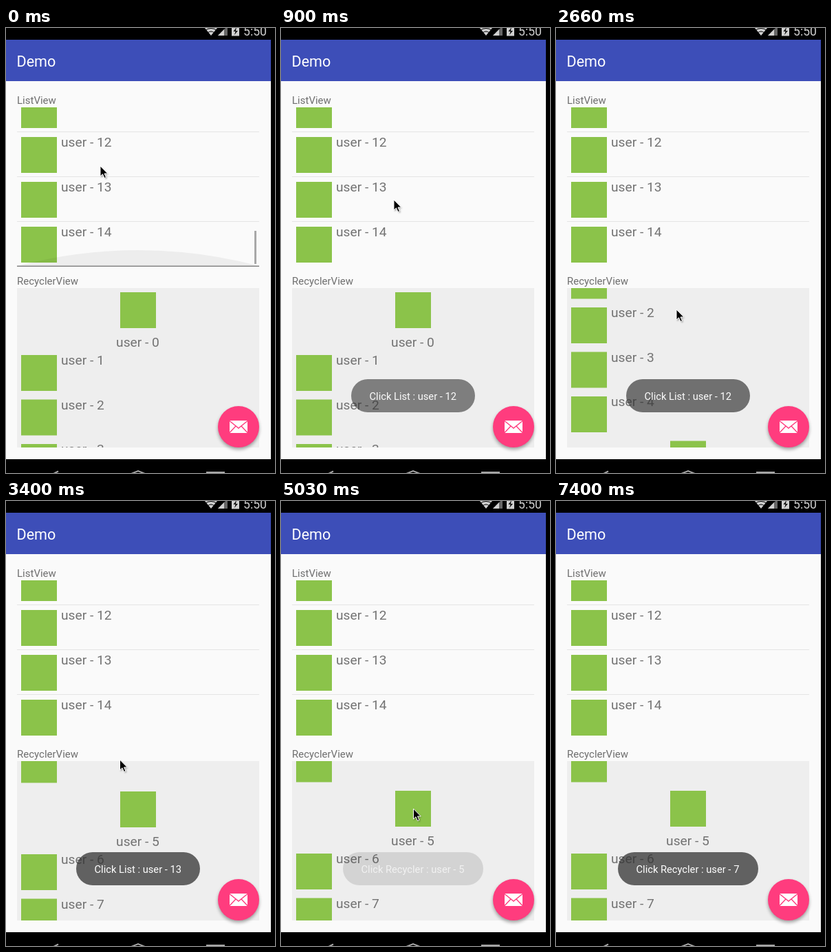
Animation of 391 by 645 pixels, one loop 7.71 s. Source, as an HTML page:

```html
<!DOCTYPE html>
<html lang="en">
<head>
<meta charset="utf-8">
<title>List demo</title>
<style>
html, body { margin: 0; width: 100%; height: 100%; overflow: hidden; background: #000; }
svg { display: block; width: 391px; height: 645px; font-family: Roboto, "Noto Sans", sans-serif; }
.row { font-size: 19.2px; fill: #737373; }
.label { font-size: 15px; fill: #6f6f6f; }
.toast text { font-size: 14.7px; fill: #fff; }
</style>
</head>
<body>
<svg viewBox="0 0 391 645">
  <defs>
    <clipPath id="listClip"><rect x="16" y="115" width="352" height="231"/></clipPath>
    <clipPath id="gridClip"><rect x="16" y="377" width="352" height="231"/></clipPath>
    <filter id="soft" x="-30%" y="-30%" width="160%" height="160%"><feGaussianBlur stdDeviation="2.5"/></filter>
    <filter id="drop" x="-50%" y="-50%" width="200%" height="200%"><feGaussianBlur stdDeviation="1"/></filter>
  </defs>

  <rect width="391" height="645"/>
  <rect y="17" width="385" height="608" fill="#fafafa"/>
  <g fill="#d0d0d0">
    <path d="M289 0Q298 -5 307 0L298 11Z"/>
    <path d="M290 3Q298 -2 306 3M293 7Q298 3 303 7" fill="none" stroke="#000"/>
    <path d="M322 -3V11H308Z" fill="#666"/>
    <path d="M317 2V11H308Z"/>
    <rect x="328" y="-4" width="11" height="15.5"/>
    <path d="M335 -1L330.5 5H333.5L332 10L337 4H334Z" fill="#111"/>
    <text x="345" y="11" font-size="17.6">5:50</text>
  </g>
  <rect y="17" width="385" height="60" fill="#3d4eb8"/>
  <text x="15.5" y="56" font-size="21.6" fill="#fff">Demo</text>

  <text class="label" x="16" y="110">ListView</text>
  <g id="list" clip-path="url(#listClip)"></g>
  <g id="glow">
    <path d="M16 345Q192 299 368 345Z" opacity=".05"/>
    <rect x="16" y="344.5" width="352" height="1.5" fill="#858585"/>
    <rect x="361" y="294" width="3" height="48" fill="#a9a9a9"/>
  </g>

  <text class="label" x="16" y="372">RecyclerView</text>
  <rect x="16" y="377" width="352" height="231" fill="#eee"/>
  <g clip-path="url(#gridClip)"><g id="grid"></g></g>

  <circle cx="338" cy="581" r="30" opacity=".35" filter="url(#soft)"/>
  <circle cx="338" cy="578" r="30" fill="#ff3c7e"/>
  <rect x="325" y="569" width="26" height="18" fill="#fff"/>
  <path d="M325 569.5L338 580L351 569.5M325 586.5L334 577M351 586.5L342 577" fill="none" stroke="#ff3c7e" stroke-width="1.4"/>

  <path d="M67 647L76 642.5M182 646L192 642L202 646M291 644H318" fill="none" stroke="#a8a8a8" stroke-width="2"/>

  <g id="toasts"></g>
  <g id="cursor">
    <path d="M1 2V17L5 13.5L7.5 19L10 18L7.5 12.5H12Z" opacity=".35" filter="url(#drop)"/>
    <path d="M0 0V15L3.5 11.8L6 17.5L8.5 16.5L6 11H10.8Z" stroke="#fff"/>
  </g>
</svg>
<script>
const LOOP = 7710, STEP = LOOP / 52, LEAD = 20;
const FADE = 380;
const NS = "http://www.w3.org/2000/svg";
const $ = id => document.getElementById(id);

function add(parent, tag, attrs, text = "") {
  const el = document.createElementNS(NS, tag);
  for (const k in attrs) el.setAttribute(k, attrs[k]);
  el.textContent = text;
  return parent.appendChild(el);
}

const icon = (parent, x, y) =>
  add(parent, "rect", { x, y, width: 52, height: 52, fill: "#8bc34a" });

function userRow(parent, n, y) {
  icon(parent, 22, y);
  add(parent, "text", { class: "row", x: 80, y: y + 14 }, "user - " + n);
}

function userHeader(parent, n, y) {
  icon(parent, 166, y);
  add(parent, "text", { class: "row", x: 191.5, y: y + 79, "text-anchor": "middle" }, "user - " + n);
}

// Upper list, each row with a press highlight behind it
const press = {};
for (let n = 11; n <= 14; n++) {
  const y = 151 + (n - 12) * 65;
  press[n] = add($("list"), "rect", { x: 16, y, width: 352, height: 64 });
  userRow($("list"), n, y + 7);
  if (n < 14) add($("list"), "rect", { x: 16, y: y + 64, width: 352, height: 1, fill: "#e5e5e5" });
}

// Lower list: every fifth user spans the full width
for (let n = 0; n < 10; n++) {
  const y = 383 + Math.floor(n / 5) * 349, k = n % 5;
  if (k) userRow($("grid"), n, y + 26.5 + k * 64.5);
  else userHeader($("grid"), n, y);
}

function toast(text, w, from, to) {
  const x = 192 - w / 2;
  const el = add($("toasts"), "g", { class: "toast" });
  add(el, "rect", { x, y: 509, width: w, height: 48, rx: 24, fill: "#323232", "fill-opacity": 0.75 });
  add(el, "text", { x: x + 26.5, y: 539 }, text);
  return { el, from, to };
}

const toasts = [
  toast("Click List : user - 12", 180, 590, 2627),
  toast("Click List : user - 13", 180, 3010, 4610),
  toast("Click Recycler : user -", 204, 4970, LOOP)
];
const [five, seven] = [5, 7].map(n => add(toasts[2].el, "text", { x: 258.3, y: 539 }, n));

// Pointer stops: time, x, y
const stops = [
  [450, 137, 200], [890, 164, 249], [1040, 137, 263], [1630, 140.5, 255], [1930, 140.5, 255],
  [2370, 176, 535], [2670, 175, 408], [3000, 168, 339], [3410, 165.5, 375],
  [4300, 192.5, 446], [5340, 192.5, 446], [5780, 112, 561], [6520, 290, 660]
];

const ramp = (t, a, b) => Math.min(1, Math.max(0, (t - a) / (b - a)));
const smooth = u => u * u * (3 - 2 * u);
const tap = (t, a) => 0.08 * (ramp(t, a, a + 150) - ramp(t, a + 300, a + 600));
const fling = t => 312 * (1 - (1 - ramp(t, 2372, 3450)) ** 1.733);
const opacity = (el, v) => el.setAttribute("opacity", v);
const move = (el, x, y) => el.setAttribute("transform", `translate(${x} ${y})`);

function pointer(t) {
  let [, x, y] = stops[0];
  for (let i = 1; i < stops.length; i++) {
    const [a, px, py] = stops[i - 1], [b, qx, qy] = stops[i];
    const u = smooth(ramp(t, a, b));
    x += (qx - px) * u;
    y += (qy - py) * u;
  }
  return [x, y];
}

function draw(t) {
  move($("cursor"), ...pointer(t));
  move($("grid"), 0, -Math.round(fling(t) * 2) / 2);
  opacity($("glow"), 1 - ramp(t, 0, 600));
  for (const n in press) opacity(press[n], 0);
  opacity(press[12], tap(t, 150));
  opacity(press[13], tap(t, 1640));
  for (const { el, from, to } of toasts) {
    opacity(el, ramp(t, from, from + FADE) - ramp(t, to, to + FADE));
  }
  const swap = ramp(t, 6812, 7400);
  opacity(five, 1 - swap);
  opacity(seven, swap);
}

// The screen refreshes in even steps
const start = performance.now();
function frame() {
  const t = Math.max(0, performance.now() - start) % LOOP;
  draw(Math.floor((t + LEAD) / STEP) % 52 * STEP);
  requestAnimationFrame(frame);
}
frame();
</script>
</body>
</html>
```
